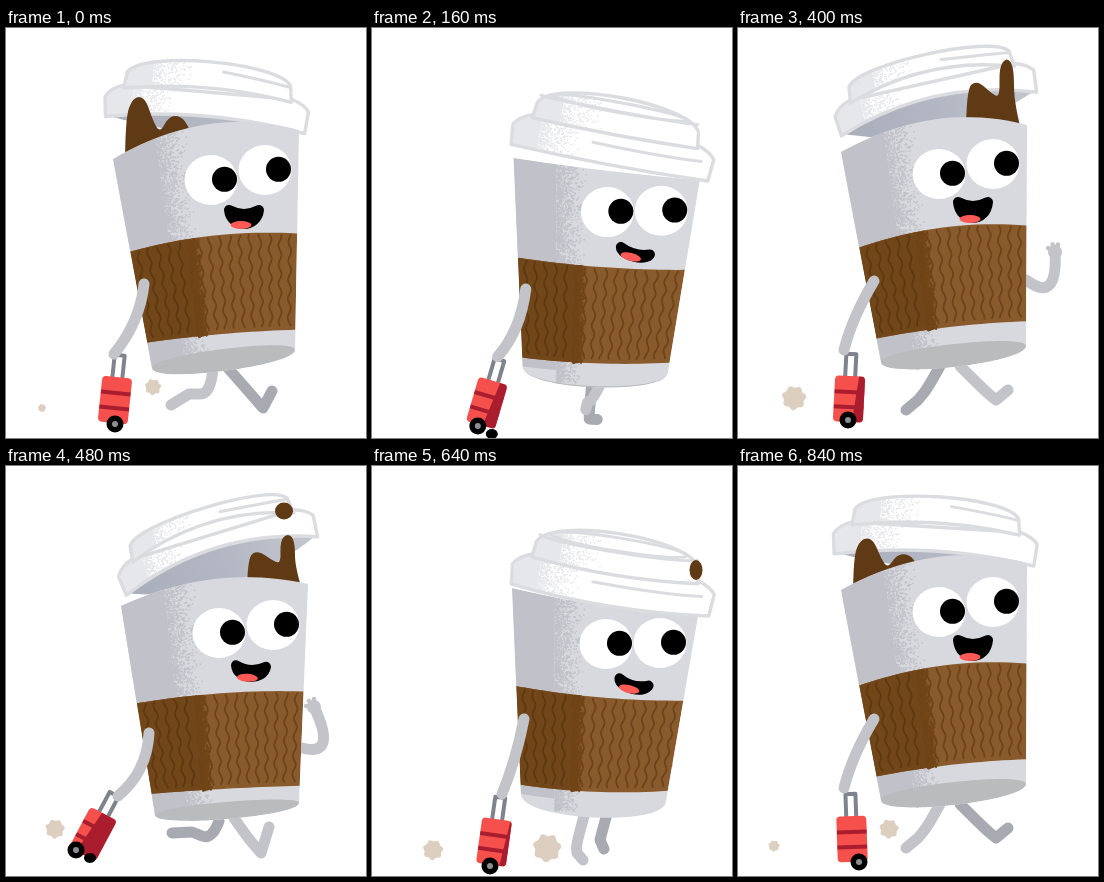
These frames come from a looping animation (360x410 px, 0.88 s). An HTML page with a canvas:

```html
<!DOCTYPE html>
<html lang="en">
<head>
<meta charset="utf-8">
<title>Coffee to go</title>
<style>
  html, body { margin: 0; width: 100%; height: 100%; overflow: hidden; background: #fff; }
  canvas { display: block; }
</style>
</head>
<body>
<canvas id="stage" width="360" height="410"></canvas>
<script>
const ctx = document.getElementById('stage').getContext('2d');
const STEP = 40, STRIDE = 11, LOOP = 22;
const C = {
  cup: '#d8d9de', cupShade: '#c1c2c9', base: '#b9bbbc',
  sleeve: '#895a2b', sleeveShade: '#714618', ridge: '#6d431a', ridgeShade: '#5d3812',
  coffee: '#5f3a14', lidLine: '#dbdce0', lidShade: '#e6e7ea', under: '#b3b7c3',
  limb: '#c3c4ca', farLimb: '#a8aab1', dust: '#dccfc0',
  red: '#f5504c', darkRed: '#a91d2f', rod: '#7f838d'
};

// Every row starts with its time in steps.
// Cup: corners TL TR BR BL, sleeve top, sleeve bottom, skew, bulges from top to base
const CUP = [
  [0, 107,131, 293,102, 289,322, 146,340, .457,.893,.03, -20,-7,-2,-10,12],
  [1, 115,140, 302,118, 293,337, 149,349, .478,.910,.026, -16,-4,-1,-7,10],
  [2, 135,145, 323,141, 298,355, 152,357, .486,.950,.02, -4,0,1,6,12],
  [5, 140,122, 326,150, 294,335, 149,328, .467,.950,-.02, 4,4,4,20,20],
  [6, 122,118, 312,118, 290,322, 144,320, .467,.925,0, 8,1,3,14,14],
  [10, 103,124, 289,97, 288,318, 143,334, .455,.888,0, -19,-9,-3,-10,13]
];
// Face: left eye, right eye, mouth, mouth opening, mouth angle
const FACE = [
  [0, 205,152, 259,142, 238,182, 14, 0],
  [1, 213,167, 267,159, 245,200, 11, 3],
  [2, 230,187, 284,183, 260,225, 6, 11],
  [5, 234,178, 288,177, 262,216, 7, 14],
  [6, 219,159, 274,154, 251,193, 10, 7],
  [10, 201,146, 255,136, 235,174, 16, 0]
];
// Shoulder, elbow, hand
const BACK_ARM = [
  [0, 138,256, 134,294, 108,326],
  [1, 143,267, 141,306, 112,330],
  [2, 153,275, 154,318, 118,332],
  [5, 152,253, 144,294, 130,328],
  [6, 144,247, 137,290, 138,335],
  [10, 136,253, 114,290, 106,322]
];
const FRONT_ARM = [
  [0, 270,280, 262,300, 262,296],
  [3, 270,285, 270,300, 268,298],
  [6, 292,256, 302,279, 334,281],
  [8, 291,252, 325,290, 346,256],
  [10, 288,252, 320,276, 317,224],
  [12, 296,282, 332,291, 308,241],
  [14, 296,302, 314,310, 300,285],
  [16, 290,300, 296,299, 294,298],
  [18, 275,290, 272,300, 268,298]
];
// Hip, knee, ankle, toe; the other leg is one stride behind
const LEG = [
  [0, 207,340, 205,366, 183,366, 165,377],
  [1, 213,355, 206,374, 186,366, 166,367],
  [2, 218,362, 207,378, 193,373, 178,377],
  [5, 235,348, 230,366, 228,374, 232,383],
  [6, 241,333, 250,352, 244,373, 250,384],
  [10, 222,338, 246,362, 258,372, 270,362],
  [11, 222,340, 243,364, 257,380, 266,363],
  [12, 228,352, 241,371, 255,387, 263,361],
  [13, 232,362, 242,380, 241,396, 253,382],
  [16, 213,347, 204,378, 205,387, 211,394],
  [17, 207,333, 190,368, 190,382, 197,394],
  [21, 202,338, 190,360, 180,372, 168,382]
];
// Lid: middle of the lower rim, angle, curve
const LID = [
  [0, 199,97, 4.9, -9], [2, 228,125, 9.5, -4], [5, 238,134, 9.2, 6],
  [6, 225,113, -.5, 14], [10, 201,86, -12.6, -18], [12, 216,100, -17, -19],
  [16, 238,134, 9.2, 6], [17, 225,113, -.5, 14], [21, 196,94, 3.5, -9]
];
// Suitcase: centre, angle, visible side, wheel
const CASE = [
  [0, 109,372, 6, 0, 109,396], [2, 104,374, 22, .36, 92,395], [6, 124,375, 8, .3, 120,400],
  [10, 111,371, 3, .3, 110,392], [12, 87,368, 28, .66, 70,384], [16, 122,376, 8, .15, 118,400],
  [21, 114,373, -2, 0, 121,396]
];
const PUFFS = [
  [[4, 102,392, 0], [5, 95,391, 13], [6, 85,388, 15], [10, 56,370, 12], [12, 49,363, 9.5], [15, 42,357, 0]],
  [[14, 188,390, 0], [15, 181,387, 11], [16, 175,382, 14], [21, 151,363, 9.5], [22, 147,359, 8], [24, 143,356, 4.5], [26, 140,353, 0]],
  [[13, 80,392, 0], [14, 72,388, 9], [16, 61,384, 10], [21, 36,380, 5.5], [22, 36,380, 4], [24, 35,379, 0]]
];
const LEFT_SLOSH = [[18, 0], [21, .83], [22, 1], [24, .7], [26, 0]];
const RIGHT_SLOSH = [[8, 0], [10, 1], [12, .75], [14.5, 0]];
const DROP = [[10, 269,44, 0,0], [11, 274,36, 8,9], [12, 278,45, 9,8.5], [16, 324,104, 6.5,10], [18, 327,124, 0,0]];
const LEFT_WAVE = [[12,10], [12,-40], [20,-62], [32,-62], [40,-38], [47,-26], [56,-43], [68,-43], [76,-32], [86,-8]];
const RIGHT_WAVE = [[-61,12], [-61,-36], [-50,-45], [-36,-32], [-27,-27], [-28,-58], [-20,-68], [-13,-58], [-13,-20], [-4,12]];

// Periodic smooth interpolation between unevenly spaced keys
function sample(keys, period, t) {
  const n = keys.length;
  while (t < keys[0][0]) t += period;
  while (t >= keys[0][0] + period) t -= period;
  let i = n - 1;
  while (keys[i][0] > t) i--;
  const row = j => keys[(j + n) % n];
  const time = j => row(j)[0] + period * Math.floor(j / n);
  const [ta, tb, tc, td] = [i - 1, i, i + 1, i + 2].map(time);
  const [a, b, c, d] = [i - 1, i, i + 1, i + 2].map(row);
  const h = tc - tb, s = (t - tb) / h;
  return b.slice(1).map((p, k) => {
    const q = c[k + 1];
    const m0 = (q - a[k + 1]) / (tc - ta) * h, m1 = (d[k + 1] - p) / (td - tb) * h;
    return p + s * (m0 + s * (3 * (q - p) - 2 * m0 - m1 + s * (2 * (p - q) + m0 + m1)));
  });
}

let seed = 7;
const random = () => (seed = seed * 16807 % 2147483647) / 2147483647;
const mix = (a, b, s) => a + (b - a) * s;
const GRAIN = Array.from({ length: 2200 }, () => [random() * random(), random()]);

function disc(x, y, rx, ry, color) {
  ctx.fillStyle = color;
  ctx.beginPath();
  ctx.ellipse(x, y, rx, ry, 0, 0, 7);
  ctx.fill();
}

function stroke(color, width) {
  ctx.strokeStyle = color;
  ctx.lineWidth = width;
  ctx.lineCap = ctx.lineJoin = 'round';
  ctx.stroke();
}

function line(points, color, width) {
  ctx.beginPath();
  points.forEach(p => ctx.lineTo(p[0], p[1]));
  stroke(color, width);
}

function fillPoly(points, color) {
  ctx.fillStyle = color;
  ctx.beginPath();
  points.forEach(p => ctx.lineTo(p[0], p[1]));
  ctx.fill();
}

function placed(x, y, degrees, draw) {
  ctx.save();
  ctx.translate(x, y);
  ctx.rotate(degrees * Math.PI / 180);
  draw();
  ctx.restore();
}

function drawPuff([x, y, r]) {
  if (r < .5) return;
  const points = [];
  for (let a = 0; a < 6.28; a += .1) {
    const d = r * (.94 + .09 * Math.cos(7 * a + 1));
    points.push([x + d * Math.cos(a), y + d * Math.sin(a)]);
  }
  fillPoly(points, C.dust);
}

function drawLeg(t, color) {
  const [hx, hy, kx, ky, ax, ay, tx, ty] = sample(LEG, LOOP, t);
  ctx.beginPath();
  ctx.moveTo(hx, hy);
  ctx.quadraticCurveTo(kx, ky, (kx + ax) / 2, (ky + ay) / 2);
  ctx.lineTo(ax, ay);
  ctx.lineTo(tx, ty);
  stroke(color, 11);
}

function drawArm([sx, sy, ex, ey, hx, hy]) {
  ctx.beginPath();
  ctx.moveTo(sx, sy);
  ctx.quadraticCurveTo(ex, ey, hx, hy);
  stroke(C.limb, 11);
}

function drawFrontArm(t) {
  const arm = sample(FRONT_ARM, LOOP, t), [, , ex, ey, hx, hy] = arm;
  drawArm(arm);
  disc(hx, hy, 7, 7, C.limb);
  const aim = Math.atan2(hy - ey, hx - ex);
  for (const turn of [-1, -.25, .45]) {
    const a = aim + turn;
    line([[hx, hy], [hx + 8 * Math.cos(a), hy + 8 * Math.sin(a)]], C.limb, 4.5);
  }
}

function drawCase(t) {
  const [x, y, angle, side, wx, wy] = sample(CASE, LOOP, t);
  placed(x, y, angle, () => {
    line([[-5, -20], [-5, -45], [5, -45], [5, -20]], C.rod, 4);
    ctx.beginPath();
    ctx.roundRect(-15, -23, 30, 46, 4);
    ctx.fillStyle = C.red;
    ctx.fill();
    ctx.clip();
    ctx.fillStyle = C.darkRed;
    for (const band of [-9, 6]) ctx.fillRect(-15, band, 30, 4);
    if (side > .03) fillPoly([[18 - 30 * side, -23], [16, -23], [16, 23], [13 - 30 * side, 23]], C.darkRed);
  });
  if (angle > 15) disc(wx + 14, wy + 8, 6, 5, '#000');
  disc(wx, wy, 8.5, 8.5, '#000');
  disc(wx, wy, 3, 3, '#8b8f94');
}

function makeCup(t) {
  const [ax, ay, bx, by, cx, cy, dx, dy, v1, v2, skew, bTop, b1, b2, bUp, bLow] = sample(CUP, STRIDE, t);
  // u runs across the cup, v down its side
  const at = (u, v) => {
    const w = v + skew * (u - .5) * Math.min(1, v * 2, (1 - v) * 10);
    const bulge = v < v1 ? mix(bTop, b1, v / v1) : v < v2 ? mix(b1, b2, (v - v1) / (v2 - v1)) : b2;
    return [mix(mix(ax, dx, w), mix(bx, cx, w), u),
            mix(mix(ay, dy, w), mix(by, cy, w), u) + bulge * 4 * u * (1 - u)];
  };
  const row = (v, from, to) => Array.from({ length: 21 }, (_, i) => at(mix(from, to, i / 20), v));
  const patch = (va, vb, to) => row(va, 0, to).concat(row(vb, to, 0));
  const arc = (x1, y1, x2, y2, b) => ctx.bezierCurveTo(x1, y1 + b * 4 / 3, x2, y2 + b * 4 / 3, x2, y2);

  function draw() {
    ctx.save();
    ctx.beginPath();
    row(0, 0, 1).forEach(p => ctx.lineTo(p[0], p[1]));
    ctx.lineTo(cx, cy);
    arc(cx, cy, dx, dy, bLow);
    ctx.closePath();
    ctx.fillStyle = C.cup;
    ctx.fill();
    ctx.clip();

    fillPoly(patch(0, 1, .23).concat([[dx, dy + 30]]), C.cupShade);
    grain(0, 1.06, .23, .17, C.cupShade);
    fillPoly(patch(v1, v2, 1), C.sleeve);
    fillPoly(patch(v1, v2, .34), C.sleeveShade);
    grain(v1, v2, .34, .07, C.sleeveShade);
    for (let i = 1; i < 17; i++) {
      const points = [];
      for (let s = .02; s <= .98; s += .03) {
        const p = at((i - .3) / 16.4, mix(v1, v2, s));
        points.push([p[0] + 1.6 * Math.sin(s * 32 + i * 1.3), p[1]]);
      }
      line(points, i < 6 ? C.ridgeShade : C.ridge, 1.8);
    }
    if (bLow - bUp > 1) {
      ctx.beginPath();
      ctx.moveTo(dx, dy);
      arc(dx, dy, cx, cy, bUp);
      arc(cx, cy, dx, dy, bLow);
      ctx.fillStyle = C.base;
      ctx.fill();
    }
    ctx.restore();
  }

  function grain(va, vb, edge, spread, color) {
    ctx.fillStyle = color;
    for (const [a, b] of GRAIN) {
      const p = at(edge + a * spread, mix(va, vb, b));
      ctx.fillRect(p[0], p[1], 1.5, 1.5);
    }
  }
  return { draw, left: [ax, ay], right: [bx, by] };
}

function drawWave([x, y], wave, height) {
  if (height < .04) return;
  const p = wave.map(([px, py]) => [x + px, y + (py < 0 ? py * height : py)]);
  ctx.beginPath();
  ctx.moveTo(...p[0]);
  for (let i = 1; i < p.length - 1; i++) {
    const end = i === p.length - 2 ? p[i + 1] : [(p[i][0] + p[i + 1][0]) / 2, (p[i][1] + p[i + 1][1]) / 2];
    ctx.quadraticCurveTo(...p[i], ...end);
  }
  ctx.fillStyle = C.coffee;
  ctx.fill();
}

function drawLid([x, y, angle, b]) {
  const rise = 20 + b * .25;
  placed(x, y, angle, () => {
    if (b < 0) {
      ctx.beginPath();
      ctx.moveTo(-97, -1);
      ctx.quadraticCurveTo(0, 2 * b, 97, -1);
      ctx.quadraticCurveTo(0, -2 * b, -97, -1);
      const shade = ctx.createLinearGradient(-97, 0, 97, 0);
      shade.addColorStop(0, '#a9aebb');
      shade.addColorStop(.5, C.under);
      shade.addColorStop(1, '#c3c6ce');
      ctx.fillStyle = shade;
      ctx.fill();
    }
    const rim = new Path2D();
    rim.moveTo(-100, 0);
    rim.lineTo(-102, -20);
    rim.quadraticCurveTo(-97, -29, -84, -33);
    rim.lineTo(84, -33);
    rim.quadraticCurveTo(97, -29, 102, -22);
    rim.lineTo(100, 0);
    rim.quadraticCurveTo(0, 2 * b, -100, 0);
    rim.closePath();
    const tier = new Path2D();
    tier.moveTo(-84, -30);
    tier.lineTo(-82, -46);
    tier.bezierCurveTo(-70, -46 - rise * 1.3, 70, -46 - rise * 1.3, 82, -46);
    tier.lineTo(84, -30);
    tier.quadraticCurveTo(0, -30 + 1.6 * b, -84, -30);
    paintShell(rim, -100, -34, 24);
    paintShell(tier, -82, -72, 52);

    ctx.beginPath();
    if (b > 2) {
      ctx.ellipse(0, -54, 80, b, 0, .1, 3.04);
      ctx.moveTo(69, -56);
      ctx.ellipse(0, -56, 69, 4 + b * .45, 0, 0, 6.28);
    } else {
      ctx.moveTo(14, -41 - rise * .75);
      ctx.quadraticCurveTo(55, -39 - rise * .6, 80, -45);
    }
    if (b > 2) {
      ctx.moveTo(-20, -18 + b * .45);
      ctx.quadraticCurveTo(45, -16 + b * .4, 90, -18);
    }
    stroke(C.lidLine, 3);
  });

  function paintShell(path, left, top, height) {
    ctx.fillStyle = '#fff';
    ctx.fill(path);
    ctx.save();
    ctx.clip(path);
    ctx.fillStyle = C.lidShade;
    ctx.fillRect(left, top, 26, height + 50);
    for (let i = 0; i < 700; i++) {
      ctx.fillRect(left + 26 + GRAIN[i][0] * 44, top + GRAIN[i][1] * (height + 30), 1.4, 1.4);
    }
    ctx.restore();
    ctx.strokeStyle = C.lidLine;
    ctx.lineWidth = 3.4;
    ctx.lineJoin = 'round';
    ctx.stroke(path);
  }
}

function drawFace(t) {
  const [lx, ly, rx, ry, mx, my, open, angle] = sample(FACE, STRIDE, t);
  for (const [x, y] of [[lx, ly], [rx, ry]]) {
    disc(x, y, 26.5, 25, '#fff');
    disc(x + 13.5, y - .7, 12.5, 12.5, '#000');
  }
  placed(mx, my, angle, () => {
    ctx.beginPath();
    ctx.moveTo(-15, 0);
    ctx.quadraticCurveTo(0, Math.min(open, 8), 15, 0);
    ctx.bezierCurveTo(13, open * 4 / 3, -13, open * 4 / 3, -15, 0);
    ctx.fillStyle = '#000';
    ctx.fill();
    stroke('#000', 10);
    disc(-3, open + 1, 10.5, 4, '#ff5a56');
  });
}

function render(t) {
  ctx.fillStyle = '#fff';
  ctx.fillRect(0, 0, 360, 410);
  const cup = makeCup(t), lid = sample(LID, LOOP, t), lidInFront = lid[3] > 1;
  PUFFS.forEach(keys => drawPuff(sample(keys, LOOP, t)));
  drawFrontArm(t);
  drawLeg(t + STRIDE, C.farLimb);
  drawLeg(t, C.limb);
  if (!lidInFront) {
    drawLid(lid);
    drawWave(cup.left, LEFT_WAVE, sample(LEFT_SLOSH, LOOP, t)[0]);
    drawWave(cup.right, RIGHT_WAVE, sample(RIGHT_SLOSH, LOOP, t)[0]);
  }
  cup.draw();
  if (lidInFront) drawLid(lid);
  const [dx, dy, drx, dry] = sample(DROP, LOOP, t);
  if (drx > .5 && dry > .5) disc(dx, dy, drx, dry, C.coffee);
  drawFace(t);
  drawCase(t);
  drawArm(sample(BACK_ARM, STRIDE, t));
}

function tick() {
  render(Math.floor(performance.now() / STEP) % LOOP);
  requestAnimationFrame(tick);
}
tick();
</script>
</body>
</html>
```
